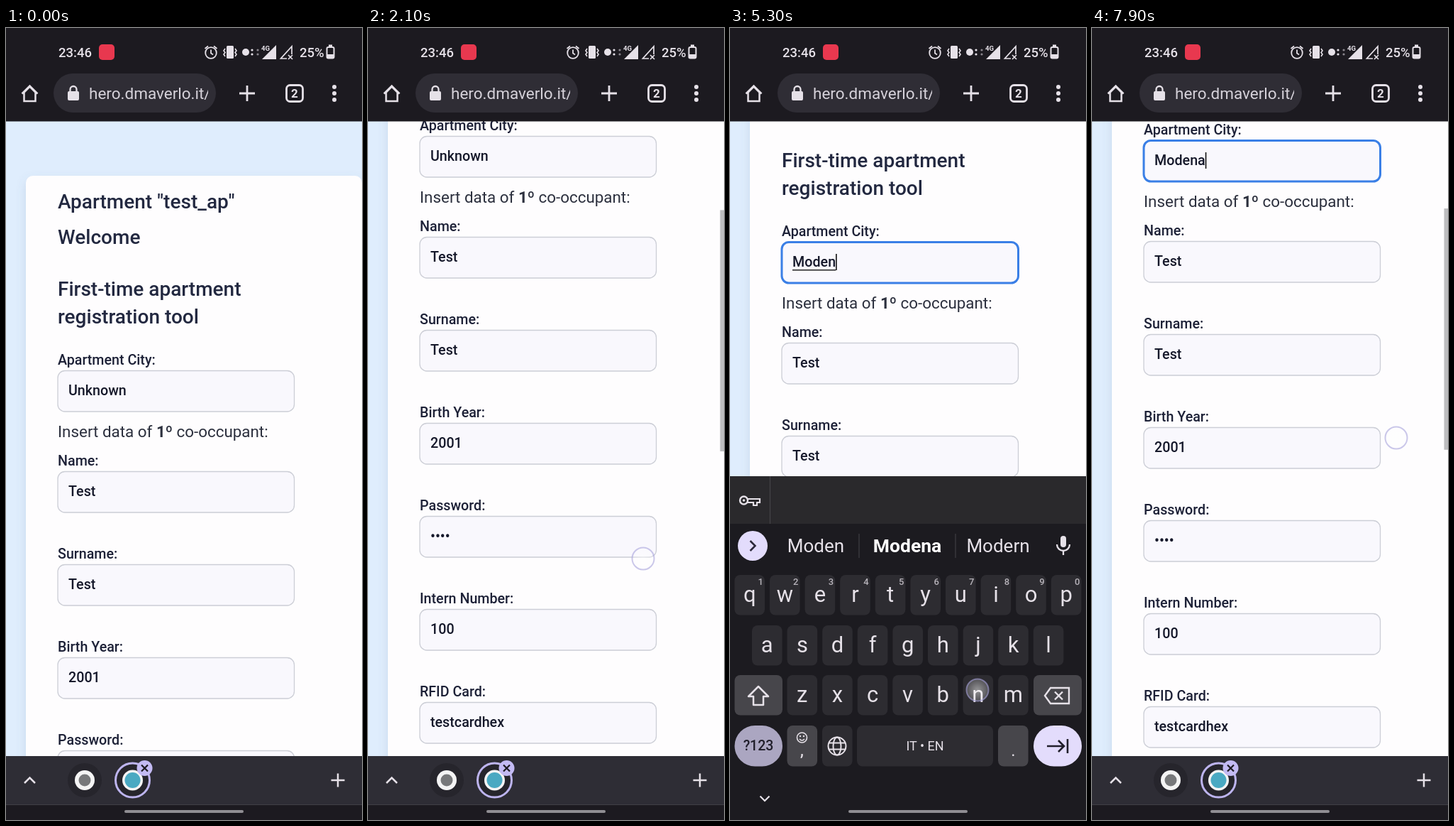
These frames come from a looping animation (502 px wide and 1115 px high, 8000 ms). An HTML page:

```html
<!DOCTYPE html>
<html lang="en">
<head>
<meta charset="utf-8">
<title>Apartment registration</title>
<style>
html, body { margin: 0; width: 100%; height: 100%; overflow: hidden; background: #1c1a20; }
svg { display: block; width: 502px; height: 1115px; font-family: Roboto, sans-serif; }
text { white-space: pre; }
.caps text.letter { text-transform: uppercase; }
</style>
</head>
<body>
<svg id="stage" viewBox="0 0 502 1115"></svg>
<script>
const BAR = '#1c1a20', LIGHT = '#e6e1e8', LILAC = '#e3dcfc', KEY = '#2d2c31', KEY2 = '#47464b';

const rect = (x, y, w, h, fill, r = 0, more = '') =>
  `<rect x="${x}" y="${y}" width="${w}" height="${h}" rx="${r}" fill="${fill}" ${more}/>`;
const disc = (x, y, r, fill, more = '') => `<circle cx="${x}" cy="${y}" r="${r}" fill="${fill}" ${more}/>`;
const line = (d, color = LIGHT, w = 2.5, more = '') =>
  `<path d="${d}" fill="none" stroke="${color}" stroke-width="${w}" ${more}/>`;
const shape = (d, fill = LIGHT) => `<path d="${d}" fill="${fill}"/>`;
const text = (x, y, size, str, fill = LIGHT, weight = 400, more = '') =>
  `<text x="${x}" y="${y}" font-size="${size}" fill="${fill}" font-weight="${weight}" ${more}>${str}</text>`;
const mid = 'text-anchor="middle"';

function page() {
  const ink = '#1d2137', fields = [
    ['Apartment City:', 'Unknown', 482.5], ['Name:', 'Test', 624.5], ['Surname:', 'Test', 755.5],
    ['Birth Year:', '2001', 886.5], ['Password:', '••••', 1017.5],
    ['Intern Number:', '100', 1148.5], ['RFID Card:', 'testcardhex', 1279.5]];
  const heads = [['Apartment "test_ap"', 254], ['Welcome', 304],
    ['First-time apartment', 377], ['registration tool', 416]];
  return rect(28, 208, 474, 2200, '#fefdfe', 10, 'filter="url(#soft)"')
    + heads.map(([s, y]) => text(73, y, 28, s, '#222840', 500)).join('')
    + fields.map(([label, value, y], i) =>
        text(73, y - 8.5, 19.7, label, ink, 500)
        + rect(73, y, 333.5, 57.5, '#f9f8fd', 10, `stroke="#ccced6" stroke-width="1.3" ${i ? '' : 'id="field"'}`)
        + text(88, y + 34.5, 19.7, value, '#15182a', 500, i ? '' : 'id="city"')).join('')
    + text(73, 575.5, 22.4, 'Insert data of <tspan font-weight="700">1º</tspan> co-occupant:', '#2c303e')
    + rect(88, 521, 0, 1.5, '#222', 0, 'id="underline"')
    + rect(0, 499, 1.6, 23, '#111', 0, 'id="cursor"')
    + '<path id="handle" fill="#a5c4f2" d="M168.5 524L178.5 532A14 14 0 1 1 158.5 532Z"/>';
}

function header() {
  return rect(0, 0, 502, 131.5, BAR)
    + text(74, 41, 18.5, '23:46', LIGHT, 500) + rect(131, 23, 22, 22, '#e8384f', 5)
    + disc(289, 35, 7.8, 'none', `stroke="${LIGHT}" stroke-width="1.8"`)
    + line('M289 30.500V35.500L292 37.500M280.500 29L285 25.500M293 25.500L297.500 29', LIGHT, 1.8)
    + rect(311, 25, 10, 18, LIGHT, 1.5)
    + line('M309 29L307 32L309 34.500L307 37L309 40M323 29L325 32L323 34.500L325 37L323 40', LIGHT, 1.6)
    + disc(338, 34, 5, LIGHT)
    + disc(347, 31, 1.6, LIGHT) + disc(347, 37, 1.6, LIGHT) + disc(355, 31, 1.6, '#8a868d') + disc(355, 37, 1.6, '#8a868d')
    + text(360, 32, 9.5, '4G', LIGHT, 700) + shape('M381 24V44H361Z')
    + line('M403 37V26L387.500 43H396M398 38L404 44M404 38L398 44', LIGHT, 1.7)
    + text(414, 41, 18.5, '25%', LIGHT, 500)
    + rect(452.500, 27, 10, 15.500, 'none', 2, `stroke="${LIGHT}" stroke-width="2"`)
    + rect(455, 23.500, 5, 3, LIGHT) + rect(453, 37, 9, 5, LIGHT)
    + line('M25.500 103V90.500L33.500 82.500L41.500 90.500V103ZM22.500 92.500L33.500 81.500L44.500 92.500', LIGHT, 2.5)
    + rect(67, 64, 229, 55, '#2f2d35', 27.5)
    + rect(87, 89, 16, 13, LIGHT, 2) + line('M90.500 90V86.500A4.500 4.500 0 0 1 99.500 86.500V90', LIGHT, 2.3)
    + text(117, 99.5, 22.5, 'hero.dmaverlo.it/', '#d6d2da', 400, 'clip-path="url(#url)"')
    + line('M340 81V103M329 92H351', LIGHT, 2.8)
    + rect(395.5, 80.500, 23, 23, 'none', 5, `stroke="${LIGHT}" stroke-width="2.8"`)
    + text(407, 98, 17, '2', LIGHT, 700, mid)
    + [83, 92, 101].map(y => disc(463, y, 3, LIGHT)).join('');
}

function toolbar() {
  return rect(0, 1025, 502, 68, '#2e2d35')
    + line('M26 1063L33.500 1055.500L41 1063')
    + disc(111, 1059, 24, '#26252c') + disc(111, 1059, 14, '#f4f4f4') + disc(111, 1059, 8.5, '#77787a')
    + disc(178.5, 1059, 24, '#26252c', 'stroke="#bdb4ee" stroke-width="3"')
    + disc(178.5, 1059, 14.5, '#f4f4f4') + disc(178.5, 1059, 11, '#4aa9c2')
    + disc(195.5, 1042, 11, '#c3baf3') + line('M191 1037.500L200 1046.500M200 1037.500L191 1046.500', BAR, 2.2)
    + line('M468 1049.500V1068.500M458.500 1059H477.500');
}

function keyRow(letters, x, y) {
  return [...letters].map((c, i) => {
    const cx = x + i * 49.6;
    return rect(cx - 21.3, y, 42.6, 56.5, KEY, 8)
      + text(cx, y + 38, 31, c, LIGHT, 400, `${mid} class="letter"`)
      + (letters.length > 9 ? text(cx + 15.5, y + 14, 13, (i + 1) % 10, '#b8b4bb', 500, mid) : '');
  }).join('');
}

function keyboard() {
  return rect(0, 698, 502, 417, '#1c1b20')
    + disc(32, 729, 21, LILAC) + line('M28.500 722L35.500 729L28.500 736', '#2b283a', 2.5)
    + rect(466, 715, 8, 16, LIGHT, 4) + line('M461 727A9 9 0 0 0 479 727M470 736V742', LIGHT, 2.3)
    + '<g id="words">' + line('M182 712V746M318 712V746', '#3d3c41', 1.3)
    + text(121, 738, 26, '', LIGHT, 400, mid) + text(250, 738, 26.5, '', '#fff', 700, mid)
    + text(378, 738, 26, '', LIGHT, 400, mid) + '</g>'
    + keyRow('qwertyuiop', 27.7, 770) + keyRow('asdfghjkl', 52.3, 841) + keyRow('zxcvbnm', 101.8, 911)
    + rect(6.5, 911, 67.5, 56.500, KEY2, 8)
    + line('M40 927L54 941H47V953H33V941H26Z', LIGHT, 2.5, 'stroke-linejoin="round"')
    + rect(428, 911, 68, 56.500, KEY2, 8)
    + line('M444 940L452 929H478V951H452ZM458 934.500L469 945.500M469 934.500L458 945.500', LIGHT, 2.4)
    + rect(6.5, 982, 67.5, 57.500, '#aba6c1', 28.7) + text(40, 1017, 19.5, '?123', '#211f2b', 500, mid)
    + rect(80.5, 982, 42.6, 57.500, KEY2, 8) + text(101.5, 1025, 22, ',', LIGHT, 500, mid)
    + disc(101.5, 999, 7, 'none', `stroke="${LIGHT}" stroke-width="1.6"`)
    + disc(99, 997, 1.2, LIGHT) + disc(104, 997, 1.2, LIGHT) + line('M98 1001Q101.500 1005 105 1001', LIGHT, 1.5)
    + rect(130, 982, 42.6, 57.500, KEY, 8) + disc(151, 1011, 12.5, 'none', `stroke="${LIGHT}" stroke-width="2"`)
    + `<ellipse cx="151" cy="1011" rx="5.500" ry="12.500" fill="none" stroke="${LIGHT}" stroke-width="2"/>`
    + line('M140 1006.500H162M140 1015.500H162', LIGHT, 2)
    + rect(179, 982, 192, 57.500, KEY, 8) + text(275, 1017, 18, 'IT • EN', LIGHT, 400, mid)
    + rect(378, 982, 42.6, 57.500, KEY2, 8) + text(399.3, 1025, 24, '.', LIGHT, 400, mid)
    + rect(428, 982, 68, 57.500, LILAC, 28.7)
    + line('M447 1011H470M463 1003L471 1011L463 1019M476 1001V1021', '#211f2b', 2.6)
    + line('M42.500 1081.500L49 1088L55.500 1081.500', LIGHT, 2.2);
}

const accessory = () => rect(0, 631, 502, 67, '#2a292c') + line('M56.500 631V698', '#454448', 1.2)
  + disc(19.5, 665, 5.5, 'none', `stroke="${LIGHT}" stroke-width="2.400"`) + disc(19.5, 665, 1.8, LIGHT)
  + line('M25 663H42V668H38V672H33V668H25', LIGHT, 2.2);

document.getElementById('stage').innerHTML = `<defs>
  <filter id="soft" x="-10%" width="120%"><feDropShadow dx="0" dy="6" stdDeviation="7" flood-color="#5a7594" flood-opacity=".18"/></filter>
  <clipPath id="url"><rect x="110" y="70" width="175" height="45"/></clipPath>
  <radialGradient id="glow"><stop offset="0" stop-color="#fff" stop-opacity=".5"/><stop offset="1" stop-color="#fff" stop-opacity=".18"/></radialGradient>
  </defs>`
  + rect(0, 0, 502, 1115, '#dfedfd') + `<g id="page">${page()}</g>`
  + rect(496.5, 0, 5.5, 0, '#bcbcbe', 0, 'id="thumb"')
  + `<g id="toolbar">${toolbar()}</g>` + rect(0, 698, 502, 395, '#1f1d1f', 0, 'id="panel"')
  + rect(0, 1093, 502, 22, BAR) + rect(0, 1093, 502, 1, '#403f45')
  + `<g id="keyboard">${keyboard()}</g><g id="accessory">${accessory()}</g>`
  + header() + '<path id="edge" fill="#444347"/>'
  + disc(0, 0, 15.5, 'url(#glow)', 'id="touch" stroke="#a9a4dc" stroke-opacity=".6" stroke-width="2"')
  + rect(167, 1101, 168, 4, '#908e93', 2);

const el = Object.fromEntries([...document.querySelectorAll('[id]')].map(e => [e.id, e]));
const set = (e, attrs) => { for (const k in attrs) e.setAttribute(k, attrs[k]); };
const show = (e, on) => set(e, { visibility: on ? 'visible' : 'hidden' });

// Linear interpolation through [time, value] points.
function along(points, t) {
  const i = points.findIndex(p => p[0] > t);
  if (i === 0) return points[0][1];
  if (i < 0) return points[points.length - 1][1];
  const [[t0, a], [t1, b]] = [points[i - 1], points[i]];
  return a + (b - a) * (t - t0) / (t1 - t0);
}

const SCROLL = [[800, 0], [900, 12], [1300, 155.5], [1700, 350], [1800, 358], [1950, 358], [2100, 330],
  [2500, 190], [2650, 181], [7500, 181], [7600, 195], [7700, 235], [7800, 285], [7900, 324]];
const THUMB = [[800, 0], [900, 1], [2900, 1], [3150, .2], [3300, 0], [7500, 0], [7600, 1]];
const DROP = [[3000, 417], [3100, 396], [3200, 200], [3300, 60], [3400, 0], [7100, 0], [7200, 101], [7300, 250], [7400, 417]];
const FADE = [[3050, 0], [3100, .2], [3300, .8], [3400, 1], [7100, 1], [7200, .45], [7400, 0]];
const EDGE = [[6950, 0], [7100, 28], [7200, 11], [7300, 0]];

const ERASE = Array.from({ length: 7 }, (_, i) => 3500 + i * 120);
const TYPE = [4600, 4800, 4950, 5100, 5250, 6500];
const KEYS = [[399, 935], [425, 796], [152, 866], [126, 796], [349, 932], [52, 866]];

// Each touch: start, end, position.
const drag = (sum, x, y) => t => {
  const py = sum - along(SCROLL, t);
  return [x - (py - y) * .32, py];
};
const TOUCHES = [
  [800, 1700, drag(790.5, 424, 635)], [1850, 2500, drag(1077, 388, 747)],
  [2850, 2950, () => [331, 336]],
  ...ERASE.map(t => [t - 30, t + 30, () => [462, 938]]),
  ...TYPE.map((t, i) => [t - 50, t + 50, () => KEYS[i]]),
  [6950, 7100, t => [along([[6950, 495], [7100, 372]], t), 567]],
  [7500, 8000, drag(901, 429, 577)]];

function draw(t) {
  const s = along(SCROLL, t), focus = t >= 2900, open = t >= 3000 && t < 7100, ready = t >= 3400 && t < 7100;
  const erased = ERASE.filter(e => e <= t).length, typed = TYPE.filter(e => e <= t).length;
  const city = erased < 7 ? 'Unknown'.slice(0, 7 - erased) : 'Modena'.slice(0, typed);
  const lastEdit = Math.max(2950, ...[...ERASE, ...TYPE].filter(e => e <= t));

  set(el.page, { transform: `translate(0 ${-s})` });
  el.city.textContent = city;
  const w = city ? el.city.getComputedTextLength() : 0;
  set(el.field, focus ? { stroke: '#3a7fe6', 'stroke-width': 3 } : { stroke: '#ccced6', 'stroke-width': 1.3 });
  set(el.cursor, { x: 88 + w });
  show(el.cursor, focus && Math.floor((t - lastEdit) / 500) % 2 === 0);
  set(el.underline, { width: w });
  show(el.underline, open);
  show(el.handle, t >= 3000 && t < 3500);

  const view = open ? 567 : 894, total = 2353;
  set(el.thumb, { y: 131 + s * view / total, height: view * view / total, opacity: along(THUMB, t) });
  show(el.toolbar, !open);
  show(el.panel, open);
  show(el.accessory, ready);
  set(el.keyboard, { transform: `translate(0 ${along(DROP, t)})`, opacity: along(FADE, t) });
  el.keyboard.classList.toggle('caps', !city);
  show(el.words, ready);
  const words = typed > 4 ? ['Moden', 'Modena', 'Modern'] : ['', city, ''];
  el.words.querySelectorAll('text').forEach((e, i) => e.textContent = words[i]);

  const x = 502 - along(EDGE, t);
  set(el.edge, { d: `M502 435C502 500 ${x} 500 ${x} 567S502 632 502 698Z` });

  const touch = TOUCHES.filter(p => t >= p[0]).pop();
  const alpha = touch ? Math.min(1, Math.max(0, 1 - (t - touch[1]) / 250)) : 0;
  set(el.touch, { opacity: alpha });
  if (alpha) {
    const [cx, cy] = touch[2](Math.min(t, touch[1]));
    set(el.touch, { cx, cy });
  }
}

const start = performance.now();
function tick() {
  draw(Math.floor((performance.now() - start) % 8000 / 100) * 100);
  requestAnimationFrame(tick);
}
tick();
</script>
</body>
</html>
```
